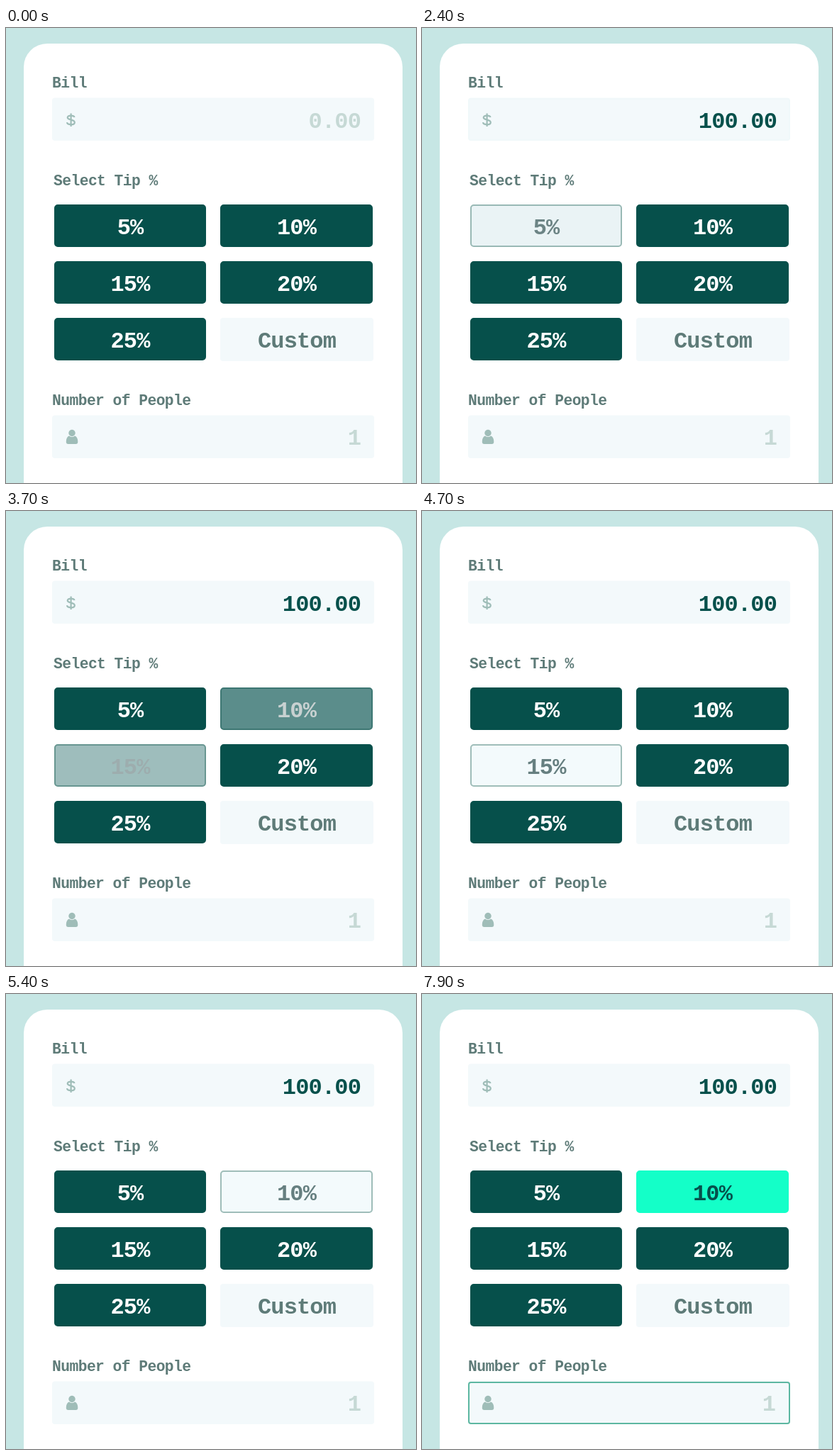
Write an HTML page that moves like this. It is 578 px wide and 642 px high and loops after 8 s.

```html
<!DOCTYPE html>
<html lang="en">
<head>
<meta charset="utf-8">
<title>Tip calculator</title>
<style>
  html, body { margin: 0; width: 100%; height: 100%; overflow: hidden; background: #c6e6e4; }
  svg { display: block; }
  text {
    font: bold 32px "Liberation Mono", "Courier New", monospace;
    letter-spacing: -0.0263em;
    fill: #5e7b78;
  }
  .label { font-size: 21.3px; }
  .mid { text-anchor: middle; }
  .end { text-anchor: end; }
  .value { fill: #06504b; }
  .hint { fill: #c6d9d5; }
  .field { fill: #f3f9fb; }
  .icon { fill: #9fbdb8; }
</style>
</head>
<body>
<svg id="stage" width="578" height="642" viewBox="0 0 578 642">
  <rect width="578" height="642" fill="#c6e6e4"/>
  <rect x="25" y="22" width="534" height="680" rx="33" fill="#fff"/>
</svg>
<script>
const LOOP = 8000, FADE = 500;
const stage = document.getElementById('stage');

const DARK = { fill: '#06504b', stroke: '#06504b', text: '#ffffff' };
const HOVER = { fill: '#f3fafc', stroke: '#9fbdb9', text: '#667f80' };
const PICKED_HOVER = { fill: '#14ffc8', stroke: '#2ceabb', text: '#06504b' };
const PICKED = { fill: '#14ffc8', stroke: '#14ffc8', text: '#06504b' };

function add(tag, attrs, content = '') {
  const el = document.createElementNS('http://www.w3.org/2000/svg', tag);
  for (const key in attrs) el.setAttribute(key, attrs[key]);
  el.textContent = content;
  return stage.appendChild(el);
}

const label = (x, y, str) => add('text', { x, y, class: 'label' }, str);

function run(el, frames) {
  el.animate(frames, { duration: LOOP, iterations: Infinity });
}

// steps: [time, style]; each change eases in over FADE ms
function fade(el, start, steps) {
  const frames = [{ ...start, offset: 0 }];
  let now = start;
  for (const [time, next] of steps) {
    frames.push({ ...now, offset: time / LOOP, easing: 'ease' });
    frames.push({ ...next, offset: Math.min(1, (time + FADE) / LOOP) });
    now = next;
  }
  frames.push({ ...now, offset: 1 });
  run(el, frames);
}

// spans: [from, to] times at which the element is visible
function show(el, ...spans) {
  const frames = [{ opacity: 0, offset: 0, easing: 'step-end' }];
  for (const [from, to] of spans) {
    frames.push({ opacity: 1, offset: from / LOOP, easing: 'step-end' });
    frames.push({ opacity: 0, offset: to / LOOP, easing: 'step-end' });
  }
  frames.push({ opacity: spans.at(-1)[1] >= LOOP ? 1 : 0, offset: 1 });
  run(el, frames);
}

function field(y, focusSteps) {
  add('rect', { x: 65, y: y - 0.5, width: 454, height: 60.5, rx: 4, class: 'field' });
  const ring = add('rect', {
    x: 66, y: y + 1, width: 452, height: 58, rx: 3,
    fill: 'none', stroke: '#5cb7a1', 'stroke-width': 2
  });
  fade(ring, { opacity: 0 }, focusSteps.map(([time, opacity]) => [time, { opacity }]));
}

function entry(str, y, cls, x, ...spans) {
  show(add('text', { x, y, class: 'end ' + cls }, str), ...spans);
}

function caret(y, ...spans) {
  show(add('rect', { x: 497, y, width: 1, height: 45, fill: '#06504b' }), ...spans);
}

function button(x, y, width, str, steps = []) {
  const box = add('rect', {
    x: x + 1, y: y + 1, width: width - 2, height: 58, rx: 4,
    fill: DARK.fill, stroke: DARK.stroke, 'stroke-width': 2
  });
  const text = add('text', { x: x + width / 2, y: y + 42, class: 'mid' }, str);
  const skin = s => ({ fill: s.fill, stroke: s.stroke });
  const ink = s => ({ fill: s.text });
  fade(box, skin(DARK), steps.map(([time, s]) => [time, skin(s)]));
  fade(text, ink(DARK), steps.map(([time, s]) => [time, ink(s)]));
}

// Bill
label(65, 84, 'Bill');
field(99, [[60, 1], [1990, 0]]);
add('path', {
  d: 'M96.5 126C96 122.8 87 122.5 86.7 126.3C86.5 130.2 97 128.6 96.8 133.3C96.5 137.4 86.3 137 86 133.2M91.6 120.5V139',
  fill: 'none', stroke: '#9fbdb8', 'stroke-width': 2.2
});
entry('0.00', 141, 'hint', 500, [0, 60]);
entry('0.00', 141, 'hint', 498, [60, 1150]);
entry('1', 141, 'value', 498, [1150, 1350]);
entry('10', 141, 'value', 498, [1350, 1600]);
entry('100', 141, 'value', 498, [1600, 1990]);
entry('100.00', 141, 'value', 500, [1990, LOOP]);
caret(107, [60, 560], [1060, 1990]);

// Tips
label(67, 222, 'Select Tip %');
button(68, 249, 214, '5%', [[2025, HOVER], [2800, DARK]]);
button(302, 249, 215, '10%', [
  [2850, HOVER], [3515, DARK], [4850, HOVER], [6000, PICKED_HOVER], [7290, PICKED]
]);
button(68, 329, 214, '15%', [[3515, HOVER], [4720, DARK]]);
button(302, 329, 215, '20%');
button(68, 409, 214, '25%');
add('rect', { x: 302, y: 409, width: 216, height: 61, rx: 4, class: 'field' });
add('text', { x: 410, y: 451, class: 'mid' }, 'Custom');

// People
label(65, 532, 'Number of People');
field(547, [[7350, 1]]);
add('circle', { cx: 93, cy: 571.5, r: 4.7, class: 'icon' });
add('path', {
  d: 'M89 575.5Q93 578.5 97 575.5Q101.3 577 101.3 584Q101.3 587 98.5 587H87.7Q84.8 587 84.8 584Q84.8 577 89 575.5Z',
  class: 'icon'
});
entry('1', 588, 'hint', 500, [0, 7350]);
entry('1', 588, 'hint', 498, [7350, LOOP]);
caret(555, [7350, 7850]);
</script>
</body>
</html>
```
